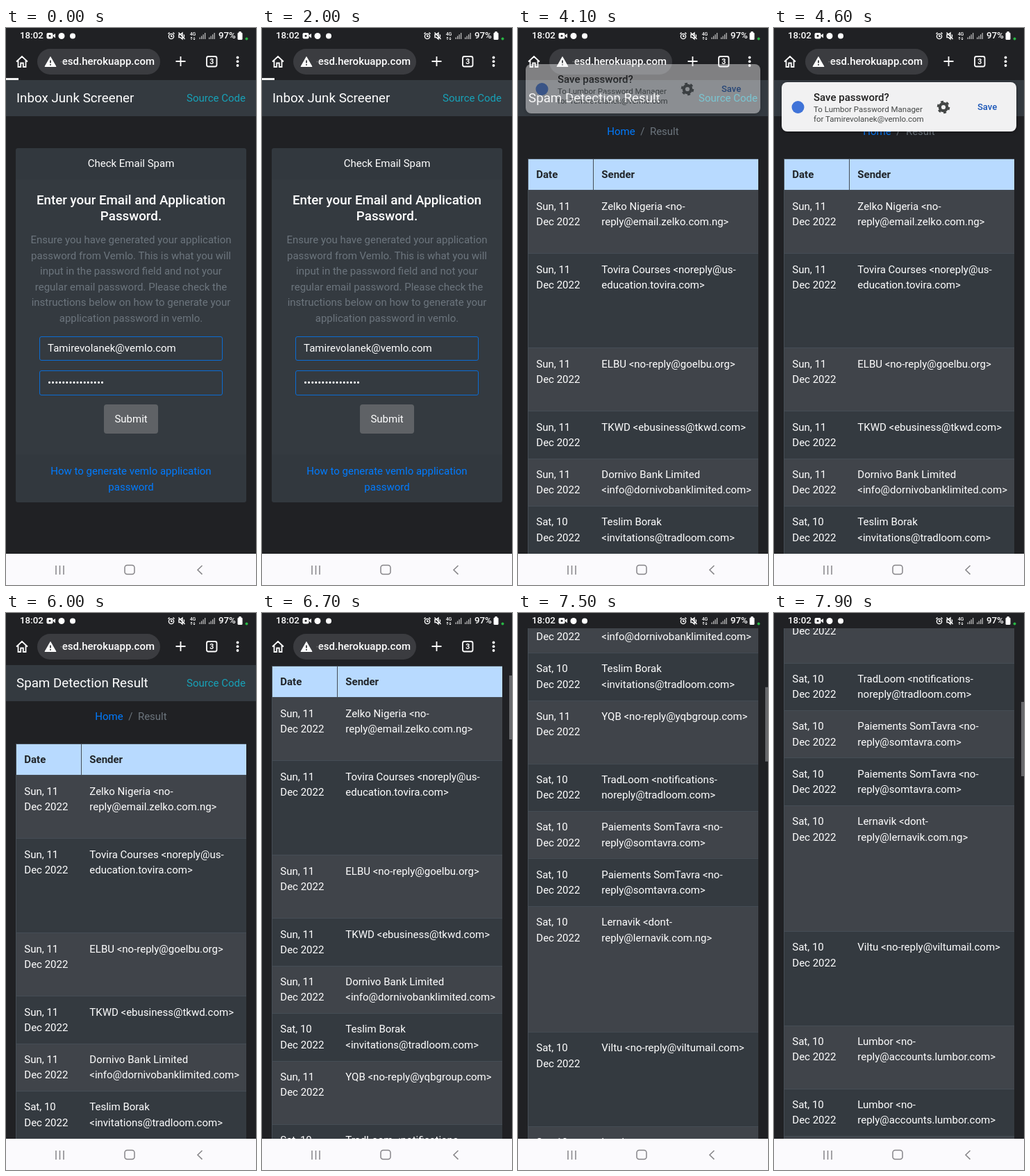
These frames come from a looping animation (360x802 px, 8 s). An HTML page:

```html
<!DOCTYPE html>
<html lang="en">
<head>
<meta charset="utf-8">
<title>Spam check</title>
<style>
  html, body { margin: 0; width: 100%; height: 100%; overflow: hidden; background: #202124; }
  body { --t: 0; position: relative; color: #fff; font: 15px/22.5px Roboto, sans-serif; }
  div, svg { position: absolute; box-sizing: border-box; }
  svg { left: 0; overflow: visible; }

  /* The clock below moves every animation through a shared negative delay. */
  .anim { animation: 8s linear calc(var(--t) * -1ms) infinite paused both; }

  #stage { left: 0; top: 0; width: 360px; height: 802px; overflow: hidden; background: #202124; }
  .page { left: 0; top: 0; width: 360px; height: 1700px; }
  #form { animation-name: leave; }
  #result { animation-name: enter; }
  #scroll { left: 0; top: 0; width: 360px; height: 1700px; animation-name: scroll; }

  .head { top: 75px; width: 360px; height: 52px; background: #343a40; }
  .title { left: 15px; top: 15px; font-size: 18.75px; white-space: nowrap; }
  .source { right: 15px; top: 15px; color: #17a2b8; white-space: nowrap; }
  .mid { left: 0; width: 100%; text-align: center; white-space: pre-line; }
  .blue { color: #007bff; }
  .grey { color: #6c757d; }

  .card { left: 14.06px; top: 173px; width: 331.88px; height: 510px; background: #343a40; border-radius: 3px; }
  .strip { left: 0; width: 100%; background: rgba(0, 0, 0, .04); }
  .field { left: 33.75px; width: 264.4px; height: 35.6px; padding: 5.6px 11.25px; border: .94px solid #0b6cd3; border-radius: 3px; white-space: nowrap; }
  .button { left: 127px; top: 369px; width: 78px; height: 42px; line-height: 42px; text-align: center; background: #5f6266; border-radius: 4px; }

  #table { left: 14.06px; top: 187.6px; width: 331.88px; border-left: .94px solid #454d55; }
  #table > div { position: relative; width: 100%; border-top: .94px solid #454d55; background: #343a40; }
  #table > div:nth-child(even) { background: #40444a; }
  #table > div.th { height: 45.9px; background: #b8daff; color: #212529; font-weight: 700; }
  #table > div > div { top: 0; height: 100%; padding: 11.25px; white-space: pre; }
  .date { left: 0; }
  .from { left: 94px; width: 237px; }
  .th .from { box-shadow: -1px 0 #454d55; }

  #bar { left: 0; top: 22px; width: 360px; height: 53px; background: #202124; animation-name: hide; }
  .pill { left: 45px; top: 8px; width: 177px; height: 37px; border-radius: 19px; background: #3b3c40; }
  .url { left: 78px; top: 15px; width: 136px; height: 23px; overflow: hidden; display: flex; justify-content: flex-end; font-weight: 500; white-space: nowrap;
    -webkit-mask: linear-gradient(90deg, transparent, #000 5px); mask: linear-gradient(90deg, transparent, #000 5px); }
  #load { left: 0; top: 50px; width: 18px; height: 2.5px; background: #f2f2f2; animation-name: leave; }

  #popup { left: 11px; top: 78px; width: 338px; height: 71px; border-radius: 8px; background: #f1f1f2; color: #1f1f1f;
    box-shadow: 0 1px 5px rgba(0, 0, 0, .4); white-space: nowrap; animation-name: popup; }
  #popup div { left: 46px; }
  #popup .small { font-size: 11.5px; color: #444746; }

  #status { left: 0; top: 0; width: 360px; height: 22px; background: #202124; font-weight: 500; font-size: 13.3px; }
  #status div { top: 0; line-height: 22px; }
  #thumb { left: 356px; top: 0; width: 4px; background: #67686b; animation-name: thumb; }
  #keys { left: 0; top: 757px; width: 360px; height: 45px; background: #fbfafd; }

  @keyframes leave { 0% { visibility: visible; } 41%, 100% { visibility: hidden; } }
  @keyframes enter { 0%, 40.9% { visibility: hidden; } 41%, 100% { visibility: visible; } }
  @keyframes popup {
    0%, 47.5% { transform: translateY(-60px); opacity: 0; }
    51.25% { transform: translateY(-26px); opacity: .46; animation-timing-function: ease-out; }
    57.5%, 68.75% { transform: none; opacity: 1; animation-timing-function: ease-in; }
    75%, 100% { transform: translateX(350px); opacity: 0; }
  }
  @keyframes scroll {
    0%, 79.125% { transform: none; animation-timing-function: cubic-bezier(.333, .055, .667, .39); }
    83.75% { transform: translateY(-112px); animation-timing-function: cubic-bezier(.333, .273, .667, .653); }
    90% { transform: translateY(-448px); animation-timing-function: cubic-bezier(.333, .498, .667, .858); }
    98.75%, 100% { transform: translateY(-776px); }
  }
  @keyframes hide {
    0%, 83.75% { transform: none; }
    85%, 100% { transform: translateY(-53px); }
  }
  @keyframes thumb {
    0%, 79.125% { transform: translateY(75px); height: 92px; opacity: 0; }
    80%, 80.1% { transform: translateY(76px); height: 92px; opacity: 1; }
    83.75% { transform: translateY(90px); height: 92px; }
    85% { transform: translateY(39px); height: 107px; }
    90% { transform: translateY(80px); height: 107px; animation-timing-function: cubic-bezier(.333, .498, .667, .858); }
    98.75%, 100% { transform: translateY(128px); height: 107px; opacity: 1; }
  }
</style>
</head>
<body>
<div id="stage">
  <div id="form" class="page anim">
    <div class="head"><div class="title">Inbox Junk Screener</div><div class="source">Source Code</div></div>
    <div class="card">
      <div class="strip" style="top:0;height:45px"></div>
      <div class="strip" style="top:441px;height:69px"></div>
      <div class="mid" style="top:11px">Check Email Spam</div>
      <div class="mid" style="top:64px;font-size:18.75px;font-weight:500">Enter your Email and Application
Password.</div>
      <div class="mid grey" style="top:121px">Ensure you have generated your application
password from Vemlo. This is what you will
input in the password field and not your
regular email password. Please check the
instructions below on how to generate your
application password in vemlo.</div>
      <div class="field" style="top:270.5px">Tamirevolanek@vemlo.com</div>
      <div class="field" style="top:320.2px">••••••••••••••••</div>
      <div class="button">Submit</div>
      <div class="mid blue" style="top:454px">How to generate vemlo application
password</div>
    </div>
  </div>

  <div id="result" class="page anim">
    <div id="scroll" class="anim">
      <div class="head"><div class="title">Spam Detection Result</div><div class="source">Source Code</div></div>
      <div class="mid grey" style="top:138px"><span class="blue">Home</span><span style="margin:0 7.5px">/</span>Result</div>
      <div id="table"><div class="th"><div class="date">Date</div><div class="from">Sender</div></div></div>
    </div>
  </div>

  <div id="thumb" class="anim"></div>

  <div id="bar" class="anim">
    <div class="pill"></div>
    <svg width="360" height="53" fill="none" stroke="#fff" stroke-width="1.8">
      <path d="M15 26.5 23 19l8 7.5M17.5 25v9h3.7v-5.5h3.6V34h3.7v-9"/>
      <path d="M64 19.5 72 33.5H56Z" fill="#fff" stroke-linejoin="round" stroke-width="1"/>
      <path d="M64 24.5v4M64 30v1.8" stroke="#3b3c40"/>
      <path d="M244.5 26h14M251.5 19v14"/>
      <rect x="289" y="19" width="14.5" height="14.5" rx="2.5"/>
      <g fill="#fff" stroke="none">
        <circle cx="333.5" cy="20.5" r="1.9"/><circle cx="333.5" cy="26.2" r="1.9"/><circle cx="333.5" cy="32" r="1.9"/>
        <text x="296.3" y="30" font-size="10.5" font-weight="700" text-anchor="middle">3</text>
      </g>
    </svg>
    <div class="url">-esd.herokuapp.com</div>
    <div id="load" class="anim"></div>
  </div>

  <div id="popup" class="anim">
    <svg width="338" height="71">
      <circle cx="23.5" cy="36" r="9" fill="#3f73d8"/>
      <g fill="none" stroke="#444746">
        <circle cx="233" cy="36" r="5.2" stroke-width="4.2"/>
        <circle cx="233" cy="36" r="8" stroke-width="2.6" stroke-dasharray="4 4.378"/>
      </g>
    </svg>
    <div style="top:11px;font-weight:500">Save password?</div>
    <div class="small" style="top:28px">To Lumbor Password Manager</div>
    <div class="small" style="top:42px">for Tamirevolanek@vemlo.com</div>
    <div style="left:282px;top:25px;font-size:13px;font-weight:500;color:#1a56b8">Save</div>
  </div>

  <div id="status">
    <div style="left:20px">18:02</div>
    <div style="left:306px">97%</div>
    <svg width="360" height="22" fill="#fff">
      <rect x="58.5" y="7" width="9" height="8.5" rx="2"/><path d="M67 11 71 8v6.5Z"/>
      <circle cx="63" cy="11.2" r="1.5" fill="#202124"/>
      <circle cx="80" cy="11.5" r="4.5"/><circle cx="96" cy="11.5" r="4"/>
      <g fill="none" stroke="#fff" stroke-width="1.4">
        <circle cx="238" cy="12" r="3.6"/>
        <path d="M238 9.8v2.4h1.7M233.5 8.5l2-2M242.5 8.5l-2-2M249 9.5h2l3-2.5v9l-3-2.5h-2ZM248.5 6.5l9 9.5M256 9.5q1.5 2 0 4"/>
        <path d="M267 17v-4m-1.3 1.3 1.3-1.3 1.3 1.3M271 13v4m-1.3-1.3 1.3 1.3 1.3-1.3" stroke-width=".9"/>
      </g>
      <text x="269" y="11" font-size="7" text-anchor="middle">4G</text>
      <path id="sig" d="M278.5 13.5h1.3V16h-1.3ZM281 11.5h1.3V16H281ZM283.5 9.3h1.3V16h-1.3ZM286 7h1.3v9H286Z" fill="#bbb"/>
      <use href="#sig" x="13.5"/>
      <rect x="333.5" y="6.5" width="7" height="10.5" rx="1.5"/><rect x="335.5" y="5" width="3" height="2"/>
      <circle cx="346.5" cy="15.5" r="2" fill="#27b544"/>
    </svg>
  </div>

  <div id="keys">
    <svg width="360" height="45" fill="none" stroke="#858488" stroke-width="1.5">
      <path d="M72 17v13M77.5 17v13M83 17v13M282.5 17l-6.5 6.3 6.5 6.3"/>
      <rect x="171" y="16.5" width="14" height="13" rx="3.5"/>
    </svg>
  </div>
</div>

<script>
  const SUN = 'Sun, 11\nDec 2022', SAT = 'Sat, 10\nDec 2022';
  // Height in text lines, date, sender
  const rows = [
    [3, SUN, 'Zelko Nigeria <no-\nreply@email.zelko.com.ng>'],
    [5, SUN, 'Tovira Courses <noreply@us-\neducation.tovira.com>'],
    [3, SUN, 'ELBU <no-reply@goelbu.org>'],
    [2, SUN, 'TKWD <ebusiness@tkwd.com>'],
    [2, SUN, 'Dornivo Bank Limited\n<info@dornivobanklimited.com>'],
    [2, SAT, 'Teslim Borak\n<invitations@tradloom.com>'],
    [3, SUN, 'YQB <no-reply@yqbgroup.com>'],
    [2, SAT, 'TradLoom <notifications-\nnoreply@tradloom.com>'],
    [2, SAT, 'Paiements SomTavra <no-\nreply@somtavra.com>'],
    [2, SAT, 'Paiements SomTavra <no-\nreply@somtavra.com>'],
    [7, SAT, 'Lernavik <dont-\nreply@lernavik.com.ng>'],
    [5, SAT, 'Viltu <no-reply@viltumail.com>'],
    [3, SAT, 'Lumbor <no-\nreply@accounts.lumbor.com>'],
    [2, SAT, 'Lumbor <no-\nreply@accounts.lumbor.com>'],
    [3, SAT, 'Lumbor <no-\nreply@accounts.lumbor.com>']
  ];

  function add(parent, name, text = '') {
    const el = document.createElement('div');
    el.className = name;
    el.textContent = text;
    return parent.appendChild(el);
  }

  const table = document.getElementById('table');
  for (const [lines, date, from] of rows) {
    const row = add(table, 'row');
    row.style.height = lines * 22.5 + 23.44 + 'px';
    add(row, 'date', date);
    add(row, 'from', from);
  }

  // The screen changes ten times a second; 16 ms allows for a late paint.
  function tick(now) {
    const t = Math.floor((now + 16) / 100) * 100 % 8000;
    document.body.style.setProperty('--t', t);
    requestAnimationFrame(tick);
  }
  requestAnimationFrame(tick);
</script>
</body>
</html>
```
